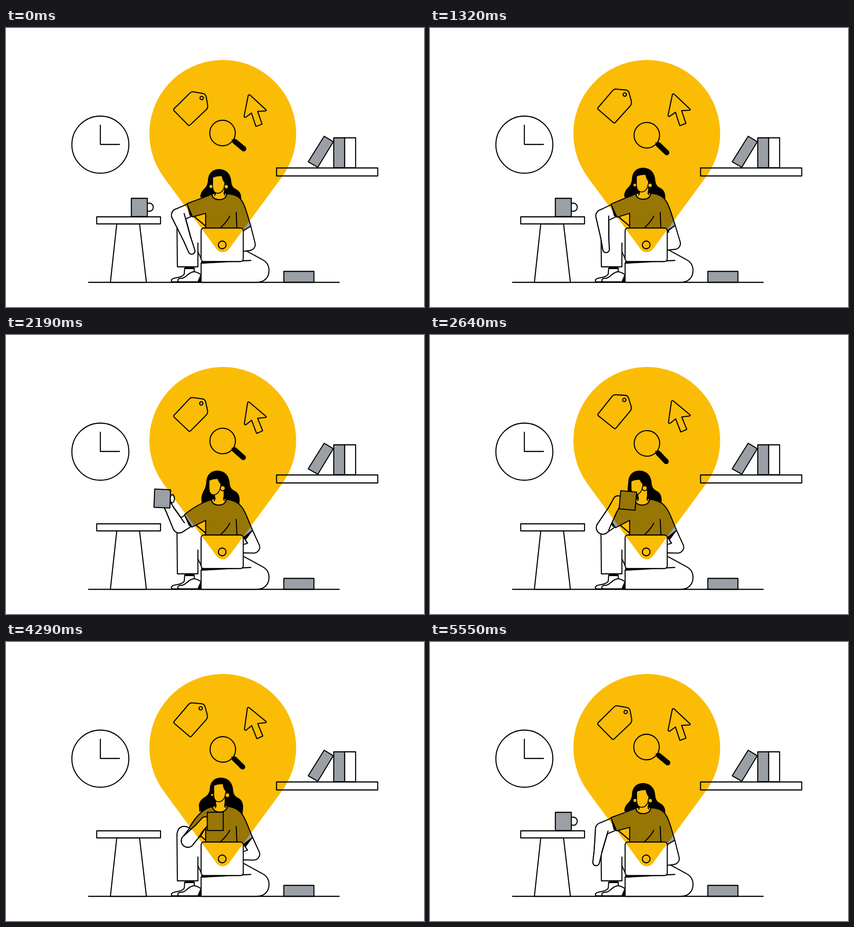
An HTML page with a canvas that plays this animation: 917x611 px, repeating every 5.58 s.

```html
<!DOCTYPE html>
<html lang="en">
<head>
<meta charset="utf-8">
<title>Working on the floor</title>
<style>
html, body { margin: 0; width: 100%; height: 100%; overflow: hidden; background: #fff; }
canvas { display: block; }
</style>
</head>
<body>
<canvas id="stage" width="917" height="611"></canvas>
<script>
const g = document.getElementById('stage').getContext('2d');
const LOOP = 5580, STEP = 30, SWAY = 1860, LINE = 2.3, UPPER_ARM = 66;
const GRAY = '#9aa0a6', YELLOW = '#fbbc05';

// Joint angles in degrees, forearm reach in pixels; the rest are amounts that steer body and mug
const rest = { upper: 157, fore: 69, reach: 84, lift: 0, lean: 0, turn: .15, tip: 0, hold: 0 };
const type = { ...rest, fore: 58, reach: 80, turn: 0 };
const point = { ...rest, upper: 150, fore: 163, reach: 54, lift: 1, turn: 1 };
const grip = { ...point, fore: 194, reach: 61 };
const sip = { ...grip, upper: 145, fore: 299, reach: 68, lean: -8, hold: 1 };
const drink = { ...sip, upper: 162, fore: 311, reach: 64, lean: -10, tip: 1 };
const chest = { ...sip, upper: 129, fore: 312, reach: 57, lean: 4, turn: .45 };
const swing = { ...rest, fore: 100, reach: 74 };
const schedule = [
  [0, rest], [810, type], [1140, type], [1700, point], [1920, grip], [2500, sip], [2900, sip],
  [3350, drink], [3600, drink], [4100, chest], [4600, chest], [5400, grip], [5550, swing], [LOOP, rest]
];

const mix = (a, b, s) => a + (b - a) * s;
function poseAt(t) {
  const i = schedule.findIndex(([end]) => t < end), [t0, a] = schedule[i - 1], [t1, b] = schedule[i];
  const u = (t - t0) / (t1 - t0), s = u * u * (3 - 2 * u), pose = {};
  for (const k in a) pose[k] = mix(a[k], b[k], s);
  return pose;
}
const rad = degrees => degrees * Math.PI / 180;
const along = ([x, y], angle, d) => [x + d * Math.cos(angle), y + d * Math.sin(angle)];

function draw(path, fill, width = LINE) {
  if (fill) { g.fillStyle = fill; g.fill(path); }
  if (width) { g.lineWidth = width; g.stroke(path); }
}
const svg = (d, fill, width) => draw(new Path2D(d), fill, width);

function box(x, y, w, h, fill = '#fff') {
  const p = new Path2D();
  p.rect(x, y, w, h);
  draw(p, fill);
}
function disc(x, y, r, fill, width) {
  const p = new Path2D();
  p.arc(x, y, r, 0, 7);
  draw(p, fill, width);
}
// Corners are [x, y, radius]
function rounded(corners) {
  const p = new Path2D(), n = corners.length;
  const [a, b] = [corners[n - 1], corners[0]];
  p.moveTo((a[0] + b[0]) / 2, (a[1] + b[1]) / 2);
  corners.forEach(([x, y, r], i) => {
    const next = corners[(i + 1) % n];
    p.arcTo(x, y, next[0], next[1], r);
  });
  p.closePath();
  draw(p);
}
function placed(x, y, angle, paint) {
  g.save();
  g.translate(x, y);
  g.rotate(angle);
  paint();
  g.restore();
}

function tangent([x1, y1], r1, [x2, y2], r2) {
  return [Math.atan2(y2 - y1, x2 - x1), Math.acos((r1 - r2) / Math.hypot(x2 - x1, y2 - y1))];
}
function capsule(c1, r1, c2, r2) {
  const [a, b] = tangent(c1, r1, c2, r2), p = new Path2D();
  p.arc(...c1, r1, a + b, a - b + 2 * Math.PI);
  p.arc(...c2, r2, a - b, a + b);
  p.closePath();
  return p;
}

function room() {
  disc(207, 255.5, 62.5, '#fff');
  svg('M207 213V255H249');
  box(593.5, 306.5, 222, 17.5);
  svg('M698 237L718 249L684 305L663 293Z', GRAY);
  box(719, 240.5, 24, 65.5, GRAY);
  box(743, 240.5, 24, 65.5);
  box(609.5, 533, 66, 24, GRAY);
  svg('M181 557H731');
}
function table() {
  svg('M243 429L229 557H308L293 429Z', '#fff');
  box(199, 413.5, 140, 15.5);
}

// The arm hangs from the shoulder as two bones
function skeleton({ upper, fore, reach, lean, hold }) {
  const u = rad(upper), f = rad(fore);
  const shoulder = [438 + .6 * lean, 384];
  const elbow = along(shoulder, u, UPPER_ARM);
  const wrist = along(elbow, f, reach * .66), hand = along(elbow, f, reach);
  // The sleeve slides down as the forearm rises
  const cuff = along(shoulder, u, 38 - 6 * Math.min(0, Math.sin(f)));
  const wristSize = 8.5 + 1.5 * hold, handSize = 7 + 3 * hold;
  return {
    elbow, wrist, hand, wristSize,
    cuffTop: along(cuff, u + Math.PI / 2, 15.5),
    cuffEnd: along(cuff, u - Math.PI / 2, 16),
    upperPart: capsule(cuff, 13, elbow, 13),
    lowerParts: [capsule(elbow, 13, wrist, wristSize - 1), capsule(wrist, wristSize - 1, hand, handSize - 1)]
  };
}
const outline = parts => parts.forEach(p => draw(p, null, LINE * 2));
const whiten = parts => parts.forEach(p => draw(p, '#fff', 0));

function wholeArm({ upperPart, lowerParts }) {
  outline([upperPart, ...lowerParts]);
  whiten([upperPart, ...lowerParts]);
}
function forearm({ elbow, wrist, wristSize, upperPart, lowerParts }, { upper, fore }) {
  const outside = new Path2D();
  outside.rect(0, 0, 917, 611);
  outside.addPath(upperPart);
  g.save();
  g.clip(outside, 'evenodd');
  outline(lowerParts);
  g.restore();
  whiten(lowerParts);
  // The inner edge runs on into the bend of the elbow
  const side = Math.sign(Math.sin(rad(upper + 180 - fore)));
  const [a, b] = tangent(elbow, 14, wrist, wristSize), q = a + side * b;
  svg(`M${along(elbow, q, 14)}L${along(wrist, q, wristSize)}`);
}

const headTop = ({ lift, lean }) => [467 + lean, 309 - 12 * lift];
const collar = ({ lift, lean }) => [452 + .3 * lean, 364 - 3.5 * lift];
const farCuff = ({ lift }) => [537 + 4 * lift, 434 - 6 * lift];

function hair(pose) {
  const [x, y] = headTop(pose), left = -41 - 1.7 * pose.lean;
  placed(x, y, 0, () => svg(`M-24 26C-24 9 -13 0 0 0C15 0 25 9 27 25C28 42 36 42 41 46C47 50 50 58 49 68
    L48 ${378 - y}L${left + 1} ${371 - y}L${left} 60C${left + 4} 40 -27 46 -24 26Z`, '#000', 0));
}
function face(pose) {
  const { turn, lean } = pose, l = -13 - 5 * turn, r = 14 - 6 * turn, c = -1 - 7 * turn;
  const brow = 14 + 2 * turn - .4 * lean;
  placed(...headTop(pose), 0, () => {
    disc(l - 3.5, 38, 4 * (1 - turn), '#fff', 0);
    svg(`M${l} ${brow + 4}Q${l + 7} ${brow} ${r - 6} ${brow}Q${r - 5} 24 ${r} 29C${r} 44 ${c + 8} 53 ${c} 53
      C${c - 8} 53 ${l} 46 ${l} 36Z`, '#fff', 1.8);
    disc(17 - 5 * turn, 38.5, 4.5 + turn, '#fff', 2);
  });
}
function neck(pose) {
  const [nx, ny] = collar(pose), x = nx + 7.5, top = headTop(pose)[1] + 38;
  svg(`M${x} ${top}H${x + 19}V${ny + 5}H${x}Z`, '#fff', 0);
  svg(`M${x} ${ny - 5}V${ny}l-2 3M${x + 19} ${ny - 5}V${ny}l2 2`, null, 1.8);
}

function legs() {
  svg('M516 482L562 507C572 512 577 521 577 531C577 546 567 557 550 557H428V515L537 509', '#fff');
  svg('M392 526L391 539C386 547 372 546 366 549C361 552 362 556 367 556H413V526Z', '#fff');
  svg('M378 556C375 549 380 548 386 548C395 548 398 536 411 534C418 533 422 537 428 540L421 556Z', '#fff');
  svg('M393 523H412V528H393Z', '#000', 0);
  const knee = 'M376 523L375 425C375 402 391 401 402 407L412 412L438 434';
  svg(knee + 'V506H421V523Z', '#fff', 0);
  svg(knee + 'M376 523H421V471M421 490L429 507');
  svg('M421 557L429 540V557Z', '#000', 0);
}

function farArm(pose) {
  const { lift } = pose, cuff = farCuff(pose), y = 490 - 13 * lift, p = new Path2D();
  p.moveTo(...cuff);
  p.arcTo(550 + 14 * lift, 485 - 7 * lift, 515, y, 13);
  p.lineTo(515, y);
  draw(p, '#fff');
  svg(`M522 444l${8 * lift} ${12 * lift}L520 ${444 + 15 * lift}`);
  svg(`M${cuff}L521 444l${4 * lift} ${5 * lift}Z`, '#000', 1);
}

function torso(pose, { cuffTop, cuffEnd }) {
  const [nx, ny] = collar(pose), end = nx + 32;
  const neckline = `C${end} ${ny + 16} ${nx} ${ny + 16} ${nx} ${ny}`;
  const [bx, by] = cuffTop, [gx, gy] = cuffEnd;
  svg(`M${cuffTop}L${cuffEnd}l-6 -3Z`, '#000', 1);
  // A lowered sleeve makes the shoulder rounder
  svg(`M${nx} ${ny}Q${(nx + bx) / 2} ${(ny + by) / 2 - .9 * (by - 385)} ${bx} ${by}L${gx} ${gy}
    L438 406V446H520L522 443L${farCuff(pose)}C522 384 520 364 ${end} ${ny - 1}${neckline}Z`, GRAY);
  svg('M505 404L506.5 438M491 412Q486 423 470 438');
  svg(`M${end} ${ny - 1}${neckline}`, '#fff');
}

function laptop() {
  svg('M428 511H505L428 516Z', '#000', 0);
  const p = new Path2D();
  p.roundRect(428, 438, 92.5, 73.5, 6);
  draw(p, '#fff');
  disc(474.3, 475, 8.5);
}
function mug({ hold, tip }, [hx, hy]) {
  // Gripped by the handle at first, then cupped from the left
  const x = hold ? hx + mix(-29, 22, hold) : 292.5, y = hold ? hy + mix(-9, 0, hold) : 393;
  placed(x, y, .09 * hold * (x < 440) + .03 * tip, () => {
    const p = new Path2D(), h = 20 - tip, bottom = `Q0 ${h + 7 * tip} -17.5 ${h}`;
    p.ellipse(22, -.5, 8.5 * (1 - hold), 9, 0, 0, 7);
    if (hold < .9) draw(p, '#fff');
    svg(`M-17.5 ${-h}Q0 ${-h - 8 * tip} 17.5 ${-h}V${h}${bottom}Z`, GRAY);
    svg(`M-17.5 ${h}Q0 ${h - 7 * tip} 17.5 ${h}${bottom}Z`, '#000', 1);
  });
}

function icons(t) {
  const phase = t / SWAY * 2 * Math.PI, w = (1 - Math.cos(phase)) / 2;
  placed(405, 177 - 9 * w, rad(-7.3 * w), () => {
    rounded([[-38.5, 2, 3], [2, -38, 9], [33, -32.5, 9], [38.5, -2, 12], [-3.5, 37.5, 3]]);
    disc(24.3, -23.7, 3.7);
  });
  placed(475 + w, 230 + 7.8 * w, rad(7.2 * w), () => {
    disc(0, 0, 28);
    svg('M21 15L28 20');
    svg('M27 18.5L46.5 34.5', null, 11.5);
  });
  const swayed = -1.6 - 2.3 * Math.cos(phase - 2.07);
  placed(571.5, 181 - 10 * w * t / LOOP, rad(swayed), () => rounded([
    [-39, -37.5, 2.5], [1.5, .5, 1.5], [-19.5, 1.5, 0], [-10, 29.5, .5],
    [-23.5, 34.5, .5], [-33, 5, 0], [-50.5, 17.5, 2.5]
  ]));
}

function pin() {
  g.globalCompositeOperation = 'multiply';
  draw(capsule([475.5, 231], 161, [475.5, 474], 17), YELLOW, 0);
  g.globalCompositeOperation = 'source-over';
}

function frame() {
  const t = Math.floor(performance.now() % LOOP / STEP) * STEP;
  const pose = poseAt(t), arm = skeleton(pose);
  g.fillStyle = '#fff';
  g.fillRect(0, 0, 917, 611);
  g.strokeStyle = '#000';
  g.lineCap = g.lineJoin = 'round';
  room();
  hair(pose);
  legs();
  farArm(pose);
  wholeArm(arm);
  torso(pose, arm);
  neck(pose);
  face(pose);
  forearm(arm, pose);
  laptop();
  table();
  mug(pose, arm.hand);
  icons(t);
  pin();
  requestAnimationFrame(frame);
}
frame();
</script>
</body>
</html>
```
